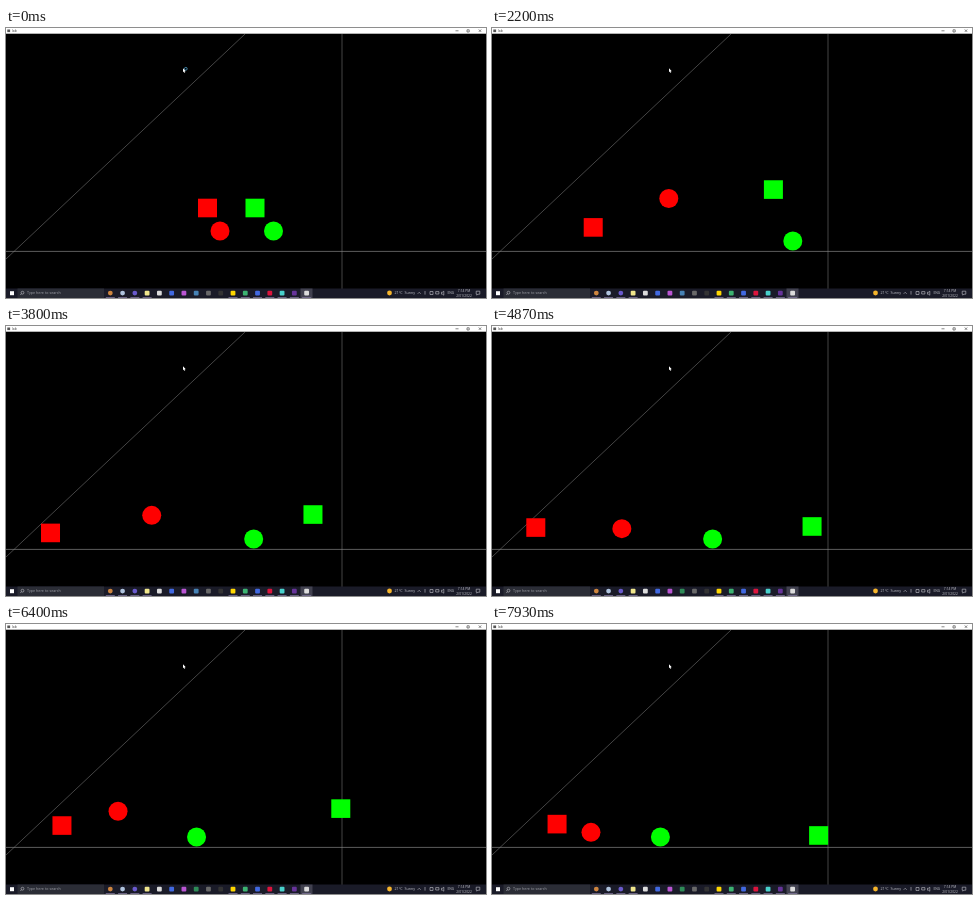
Write an HTML page that moves like this. It is 480 px wide and 270 px high and loops after 8000 ms.

```html
<!DOCTYPE html>
<html lang="en">
<head>
<meta charset="utf-8">
<title>Physics sandbox</title>
<style>
  html, body { margin: 0; width: 100%; height: 100%; overflow: hidden; background: #000; }
  svg { display: block; width: 100%; height: 100%; }
  text { font: 3.7px "Open Sans", "Noto Sans", sans-serif; fill: #c4c5cb; }
  .small { font-size: 3.3px; }
  .outline { fill: none; stroke: #c4c5cb; stroke-width: .6; }
</style>
</head>
<body>
<svg viewBox="0 0 480 270">
  <rect width="480" height="270"/>
  <g stroke="#858585" stroke-width=".7">
    <path d="M0 223.4H480"/>
    <path d="M239 6L0 231M336 6V261" opacity=".75"/>
  </g>

  <g id="bodies"></g>

  <circle id="busy" cx="179.8" cy="40.8" r="1.4" fill="none" stroke="#4f9fc8" stroke-width=".8"/>
  <path d="M177 40.3v4l.9-.8.7 1.4.6-.3-.6-1.3h1.2z" fill="#fff"/>

  <rect width="480" height="5.7" fill="#fff"/>
  <rect x="1.3" y="1.5" width="2.8" height="2.6" fill="#555"/>
  <text x="6" y="4.2" class="small" style="fill:#333">lab</text>
  <path d="M449.5 2.8h3M461 1.8h2.2v2.2H461zM472.8 1.5l2.4 2.4m0-2.4l-2.4 2.4" class="outline" style="stroke:#333"/>

  <rect y="260.5" width="480" height="9.5" fill="#1a1b28"/>
  <rect x="11.5" y="260.5" width="86.5" height="9.5" fill="#2b2d36"/>
  <rect x="4" y="263.2" width="4" height="4" fill="#fff"/>
  <path d="M17.9 264.7a1.4 1.4 0 1 0-2.8 0a1.4 1.4 0 1 0 2.8 0M15.5 265.7l-1.2 1.3" class="outline"/>
  <text x="21" y="266.3" style="fill:#a0a2a9">Type here to search</text>
  <rect x="294.5" y="260.5" width="12" height="9.5" fill="#41414f"/>
  <g id="icons"></g>
  <circle cx="383.5" cy="265" r="2.4" fill="#f6b52b"/>
  <text x="388.5" y="266.4">21°C&#160; Sunny</text>
  <path d="M411.7 265.8l1.5-1.5 1.5 1.5M419 263v3.6M424 263.5h3v3h-3zM429.7 263.6h3.2v2.4h-3.2zM435.5 264.2h1l1.3-1v4l-1.3-1h-1zM470.2 263.2h3.6v3h-2l-1 1v-1h-.6z" class="outline"/>
  <text x="441.5" y="266.3" class="small">ENG</text>
  <text x="458" y="263.8" class="small" text-anchor="middle">7:14 PM</text>
  <text x="458" y="268.6" class="small" text-anchor="middle">2/01/2022</text>
</svg>
<script>
const LOOP = 8000, FRAME = 200 / 3, DRAG = 0.2, GRAVITY = 22.7, FLOOR = 214;
const WALL = 336, RED = '#f00', GREEN = '#0f0';

// Contacts as [seconds, x, y]; y defaults to the floor. Bodies fly freely in between.
const bodies = [
  { shape: 'rect', color: RED, contacts: [[0, 201.5, 180], [.33, 196, 200], [1.2, 147.5],
    [3.48, 54], [4.18, 34, 202], [4.37, 39], [6.97, 59.6], [8, 65.4, 200]] },
  { shape: 'circle', color: RED, contacts: [[0, 214, 203], [.58, 220.2],
    [4.54, 134.4], [7.7, 100.7], [8, 98.5, 207]] },
  { shape: 'rect', color: GREEN, contacts: [[0, 249, 180], [.42, 241.5, 201],
    [4.49, 315.7], [6.55, WALL, 186], [7.83, 327.6], [8, 326, 210]] },
  { shape: 'circle', color: GREEN, rolls: true, contacts: [[0, 267.5, 203], [.38, 270, 211],
    [1.59, WALL - 10, 213], [8, 167.6, 213]] }
];

function add(parent, tag, attributes) {
  const node = document.createElementNS('http://www.w3.org/2000/svg', tag);
  for (const name in attributes) node.setAttribute(name, attributes[name]);
  return document.getElementById(parent).appendChild(node);
}

for (const body of bodies) {
  const size = body.shape === 'rect' ? { x: -9.5, y: -9.3, width: 19, height: 18.6 } : { r: 9.5 };
  body.node = add('bodies', body.shape, { ...size, fill: body.color });
}

const iconColors = 'peru lightsteelblue slateblue khaki gainsboro royalblue mediumorchid steelblue dimgray'
  + ' #333 gold mediumseagreen royalblue crimson mediumturquoise rebeccapurple gainsboro';
const icons = iconColors.split(' ').map((fill, i) => {
  const x = 104.3 + i * 12.27;
  if (i < 4 || i > 9) add('icons', 'rect', { x: x - 4.5, y: 269.2, width: 9, height: .8, fill: '#7d7399' });
  return add('icons', 'rect', { x: x - 2.4, y: 262.7, width: 4.8, height: 4.8, rx: i < 3 ? 2.4 : 1, fill });
});

// Distance covered per unit of launch speed under linear drag.
const reach = t => (1 - Math.exp(-DRAG * t)) / DRAG;

function position({ contacts, rolls }, t) {
  const next = contacts.findIndex(([time]) => time > t);
  const [t0, x0, y0 = FLOOR] = contacts[next - 1];
  const [t1, x1, y1 = FLOOR] = contacts[next];
  const part = reach(t - t0) / reach(t1 - t0);
  const fall = rolls ? 0 : GRAVITY / DRAG;
  return [
    x0 + (x1 - x0) * part,
    y0 + fall * (t - t0) + (y1 - y0 - fall * (t1 - t0)) * part
  ];
}

const busy = document.getElementById('busy');
const start = performance.now();

function draw() {
  const elapsed = (performance.now() - start) % LOOP;
  const t = Math.floor((elapsed + 5) / FRAME) % (LOOP / FRAME) * FRAME / 1000;
  for (const body of bodies) body.node.setAttribute('transform', `translate(${position(body, t)})`);
  busy.style.display = t < 1.3 ? '' : 'none';
  icons[7].setAttribute('fill', t < 4 ? 'steelblue' : 'seagreen');
  requestAnimationFrame(draw);
}

draw();
</script>
</body>
</html>
```
